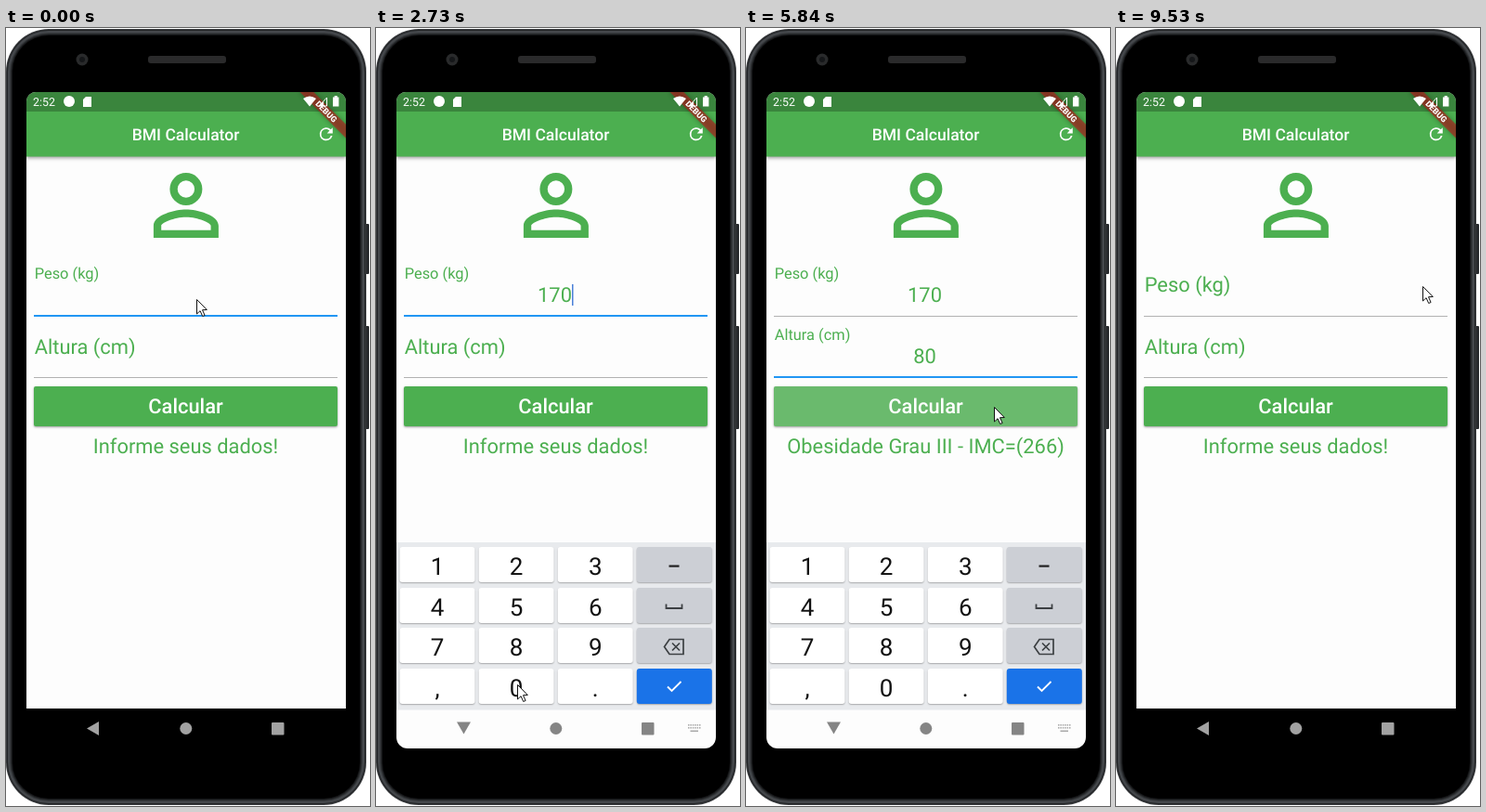
Write an HTML page with a canvas that moves like this. It is 392 px wide and 838 px high and loops after 9.6 s.

```html
<!DOCTYPE html>
<html lang="pt">
<head>
<meta charset="utf-8">
<title>BMI Calculator</title>
<style>
html, body { margin: 0; width: 100%; height: 100%; overflow: hidden; background: #fff; }
canvas { display: block; width: 392px; height: 838px; }
</style>
</head>
<body>
<canvas id="stage"></canvas>
<script>
const LOOP = 9600, HOLD = 160, LABEL_TIME = 200;
const GREEN = '#4caf50', BLUE = '#2196f3', PAPER = '#fdfdfd';
const MIDDLE = 193.5, FONT = 21.9;
const canvas = document.getElementById('stage');
const dpr = window.devicePixelRatio || 1;
canvas.width = 392 * dpr;
canvas.height = 838 * dpr;
const c = canvas.getContext('2d');
c.textRendering = 'geometricPrecision';

// The pointer travels from stop to stop; a stop with an action is pressed for HOLD ms.
const STOPS = [
  { at: 380, x: 205, y: 292, action: 'weight' },
  { at: 1500, x: 73, y: 578, action: 'key', key: '1' },
  { at: 2030, x: 82, y: 673, action: 'key', key: '7' },
  { at: 2570, x: 152, y: 707, action: 'key', key: '0' },
  { at: 3350, x: 220, y: 370, action: 'height' },
  { at: 3580, x: 118, y: 501 },
  { at: 4370, x: 150, y: 670, action: 'key', key: '8' },
  { at: 4920, x: 157, y: 721, action: 'key', key: '0' },
  { at: 5530, x: 267, y: 408, action: 'calculate' },
  { leave: 6460, at: 6620, x: 267, y: 468 },
  { leave: 7080, at: 8000, x: 345, y: 117, action: 'reset' },
  { leave: 9380, at: 9530, x: 330, y: 278 }
];
const stopFor = action => STOPS.find(s => s.action === action);
const release = stop => stop.at + (stop.action ? HOLD : 0);
const HEIGHT_FOCUS = release(stopFor('height'));
const CALCULATE = stopFor('calculate');
const RESET = stopFor('reset');

const clamp = v => Math.max(0, Math.min(1, v));
const easeOut = v => 1 - (1 - clamp(v)) ** 2;
const smooth = v => v * v * (3 - 2 * v);

function pointerAt(t) {
  const i = STOPS.findIndex(s => s.at > t);
  if (i < 1) return i ? STOPS.at(-1) : STOPS[0];
  const from = STOPS[i - 1], to = STOPS[i];
  const leave = to.leave ?? release(from);
  const arrive = to.action ? to.at - 80 : to.at;
  const k = smooth(clamp((t - leave) / (arrive - leave)));
  return { x: from.x + (to.x - from.x) * k, y: from.y + (to.y - from.y) * k };
}

function typed(t, from, to) {
  return STOPS.filter(s => s.key && s.at > from && s.at < to && release(s) <= t).map(s => s.key).join('');
}

function caretVisible(t) {
  const last = STOPS.findLast(s => ['weight', 'height', 'key'].includes(s.action) && release(s) <= t);
  return last && t < RESET.at && (t - release(last)) % 1000 < 500;
}

function rect(x, y, w, h, color) {
  c.fillStyle = color;
  c.fillRect(x, y, w, h);
}

function box(x, y, w, h, r, color) {
  c.fillStyle = color;
  c.beginPath();
  c.roundRect(x, y, w, h, r);
  c.fill();
}

function disc(x, y, r, color) {
  c.fillStyle = color;
  c.beginPath();
  c.arc(x, y, r, 0, 2 * Math.PI);
  c.fill();
}

function shape(path, x, y, scale, fill, stroke, width) {
  c.save();
  c.translate(x, y);
  c.scale(scale, scale);
  const p = new Path2D(path);
  if (fill) {
    c.fillStyle = fill;
    c.fill(p, 'evenodd');
  }
  if (stroke) {
    c.strokeStyle = stroke;
    c.lineWidth = width;
    c.stroke(p);
  }
  c.restore();
}

function text(str, x, y, size, color, align = 'center', weight = 400) {
  c.font = `${weight} ${size}px Roboto, sans-serif`;
  c.textAlign = align;
  c.fillStyle = color;
  c.fillText(str, x, y);
}

function withShadow(alpha, blur, dy, draw) {
  c.save();
  c.shadowColor = `rgba(0,0,0,${alpha})`;
  c.shadowBlur = blur * dpr;
  c.shadowOffsetY = dy * dpr;
  draw();
  c.restore();
}

function clipped(x, y, w, h, r, draw) {
  c.save();
  c.beginPath();
  c.roundRect(x, y, w, h, r);
  c.clip();
  draw();
  c.restore();
}

const PERSON = 'M12 5.9a2.1 2.1 0 1 1 0 4.2a2.1 2.1 0 1 1 0-4.2zm0 9c2.97 0 6.1 1.46 6.1 2.1v1.1H5.9V17c0-.64 3.13-2.1 6.1-2.1zM12 4a4 4 0 1 0 0 8a4 4 0 1 0 0-8zm0 9c-2.67 0-8 1.34-8 4v3h16v-3c0-2.66-5.33-4-8-4z';
const REFRESH = 'M17.65 6.35A8 8 0 1 0 19.73 14h-2.08A6 6 0 1 1 12 6c1.66 0 3.14.69 4.22 1.78L13 11h7V4z';

function phone() {
  rect(0, 0, 392, 838, '#fff');
  box(385, 211, 6, 54, 1, '#26282b');
  box(385, 321, 6, 111, 1, '#26282b');
  const rim = ['#3a3c3f', '#222426', '#45484c', '#45484c', '#383b3e', '#26282a', '#151618', '#000'];
  rim.forEach((color, i) => box(i, 1 + i, 388 - 2 * i, 836 - 2 * i, 46 - i, color));
  box(153, 30, 84, 8, 3, '#2a2a2b');
  disc(82, 34, 6.5, '#292a2b');
  disc(82, 34, 3, '#151719');
}

function statusIcons() {
  text('2:52', 29, 84, 12.4, '#fff', 'left');
  disc(68, 79, 6, '#fff');
  shape('M0 3l3-3h6v11h-9z', 83, 74, 1, '#fff');
  shape('M0 0l-7-8.5q7-5 14 0z', 327, 84.5, 1, '#fff');
  shape('M0 0l8.5-9v9z', 337, 84, 1, null, '#fff', 1);
  shape('M0 0l5-5v5z', 337, 84, 1, '#fff');
  shape('M0 1.5h1.7v-1.5h3v1.5h1.7v10h-6.4z', 352, 73, 1, '#fff');
}

function debugBanner() {
  c.save();
  c.translate(366, 69);
  c.rotate(Math.PI / 4);
  withShadow(.5, 5, 0, () => rect(-35, 24.5, 70, 10.5, 'rgba(183,28,28,.63)'));
  text('DEBUG', 0, 33, 8.9, '#fff', 'center', 900);
  c.restore();
}

function ripple(t, start, x, y, radius, strength) {
  const k = (t - start) / 480;
  if (k < 0 || k > 1) return;
  disc(x, y, radius * (.3 + .7 * easeOut(k * 2.2)), `rgba(215,225,215,${strength * Math.min(1, (1 - k) * 2)})`);
}

function field(label, value, y, raised, focused, caret) {
  text(label, 30.7, Math.floor(y - 25 - 14.7 * raised), FONT * (1 - .25 * raised), GREEN, 'left');
  text(value, 192.5, Math.round(y - 15), FONT, GREEN);
  const line = Math.round(y);
  if (focused) rect(30, line - 1, 327, 2, BLUE);
  else rect(30, line, 327, 1, '#b2b2b2');
  if (caret) rect(Math.round(192.5 + c.measureText(value).width / 2), line - 34, 1.5, 23, '#4a80d8');
}

function appBar(t) {
  withShadow(.4, 4, 1.5, () => rect(22, 69, 344, 69.5, GREEN));
  clipped(22, 69, 344, 69.5, 0, () => ripple(t, RESET.at, 345, 115, 31, .17));
  rect(22, 69, 344, 21, 'rgba(0,0,0,.24)');
  text('BMI Calculator', MIDDLE, 121, 17.5, '#fff', 'center', 500);
  shape(REFRESH, 334.3, 103.8, 21 / 24, '#fff');
}

function form(t) {
  shape(PERSON, 141.4, 138.5, 105 / 24, GREEN);
  const active = t < RESET.at;
  const onWeight = t < HEIGHT_FOCUS, onHeight = active && !onWeight;
  const weight = active ? typed(t, 0, HEIGHT_FOCUS) : '';
  const height = active ? typed(t, HEIGHT_FOCUS, LOOP) : '';
  const caret = caretVisible(t);
  const lowered = easeOut((t - RESET.at) / LABEL_TIME);
  const lifted = easeOut((t - HEIGHT_FOCUS) / LABEL_TIME);
  field('Peso (kg)', weight, 309.8, 1 - lowered, onWeight, onWeight && caret);
  field('Altura (cm)', height, 376.3, lifted - lowered, onHeight, onHeight && caret);

  withShadow(.4, 2.5, 1, () => box(30, 386, 327, 43, 2, GREEN));
  clipped(30, 386, 327, 43, 2, () => ripple(t, CALCULATE.at, CALCULATE.x, CALCULATE.y, 240, .3));
  text('Calcular', MIDDLE, 415, FONT, '#fff', 'center', 500);
  const done = active && t >= release(CALCULATE);
  text(done ? 'Obesidade Grau III - IMC=(266)' : 'Informe seus dados!', MIDDLE, 458, FONT, GREEN);
}

function app(t) {
  clipped(22, 69, 344, 664, [10, 10, 0, 0], () => {
    rect(22, 69, 344, 664, PAPER);
    appBar(t);
    form(t);
    debugBanner();
    statusIcons();
  });
}

function keyboardKeys(pressed) {
  rect(22, 554, 344, 181, '#e8eaed');
  const rows = ['123', '456', '789', ',0.'];
  rows.forEach((row, r) => {
    const y = Math.floor(559.5 + r * 43.5);
    [...row, ''].forEach((label, i) => {
      const x = 25.5 + i * 85.1;
      const plain = label === pressed ? '#e3e3e3' : '#fff';
      const color = label ? plain : r < 3 ? '#cccfd5' : '#1a73e8';
      withShadow(.28, 1.5, 1, () => box(x, y, 81, 38, 3, color));
      text(label, x + 40.5, y + 30, 26, '#111');
    });
  });
  rect(315.5, 578.5, 11, 2.2, '#222');
  shape('M0 0v4.5h17v-4.5', 312.5, 620.5, 1, null, '#3c4043', 1.8);
  shape('M5.5 0h15v16h-15l-5.5-8zM8.5 4l8 8m0-8l-8 8', 310.5, 658.5, 1, null, '#3c4043', 1.7);
  shape('M0 5.5l4.5 4.5l10-10', 314, 704, 1, null, '#fff', 1.8);
}

function keyboard(t, pressed) {
  const opening = release(STOPS[0]) + 240, closing = RESET.at + 300;
  const hidden = t < RESET.at ? 1 - easeOut((t - opening) / 240) : clamp((t - closing) / 165) ** 2;
  if (hidden === 1) return false;
  clipped(22, 540, 344, 236, [0, 0, 12, 12], () => {
    c.save();
    c.translate(0, 222 * hidden);
    keyboardKeys(pressed);
    c.restore();
    rect(22, 734.5, 344, 42, PAPER);
  });
  return true;
}

function navigation(open) {
  const gray = open ? '#858585' : '#a2a2a2';
  if (open) shape('M0 0h15l-7.5 13z', 87, 747.5, 1, gray);
  else shape('M0 7.5l13-7.5v15z', 87, 747, 1, gray);
  disc(193.8, 754.5, 6.5, gray);
  box(286, 748, 13.5, 13.5, 1, gray);
  if (!open) return;
  for (let i = 0; i < 12; i++) rect(336 + i % 6 * 2.4, 750 + Math.floor(i / 6) * 3, 1.5, 1.6, '#aaa');
  rect(338.5, 756.5, 8.5, 1.6, '#aaa');
}

function pointer({ x, y }, clicking) {
  if (clicking) disc(x - .5, y - .5, 12, 'rgba(247,232,35,.68)');
  shape('M0 0v15.5l3.6-3.3l2.6 5.8l2.4-1l-2.6-5.8l4.8-.2z', x + .5, y + .5, 1, '#fff', '#111', 1);
}

function render(t) {
  c.setTransform(dpr, 0, 0, dpr, 0, 0);
  const press = STOPS.find(s => s.action && t >= s.at && t < release(s));
  phone();
  app(t);
  navigation(keyboard(t, press?.key));
  pointer(pointerAt(t), press);
}

const origin = performance.now();
function tick() {
  render((performance.now() - origin) % LOOP);
  requestAnimationFrame(tick);
}
tick();
</script>
</body>
</html>
```
